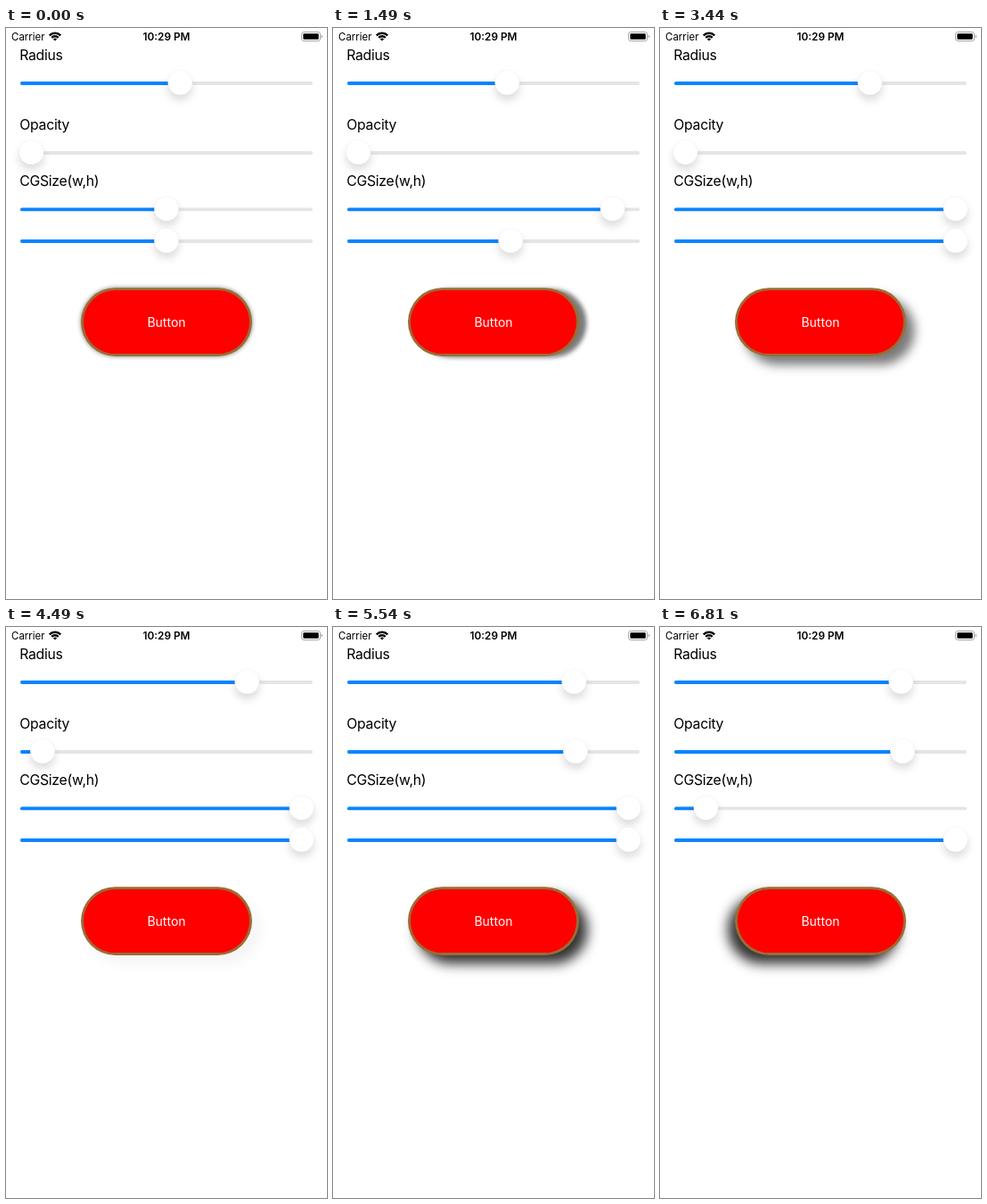
These frames come from a looping animation (360x640 px, 8000 ms). An HTML page with a canvas:

```html
<!DOCTYPE html>
<html lang="en">
<head>
<meta charset="utf-8">
<title>Button shadow</title>
<style>
html, body { margin: 0; width: 100%; height: 100%; overflow: hidden; background: #fff; }
canvas { display: block; width: 360px; height: 640px; }
</style>
</head>
<body>
<canvas id="stage"></canvas>
<script>
const LOOP = 8000;
const FONT = 'Inter, Roboto, sans-serif';
const PT = 0.96; // pixels per point
const MIN = 28.5, MAX = 331.5, MID = 180;
const canvas = document.getElementById('stage');
const ctx = canvas.getContext('2d');
const dpr = window.devicePixelRatio || 1;
canvas.width = 360 * dpr;
canvas.height = 640 * dpr;
ctx.scale(dpr, dpr);

// A drag moves a thumb to x in a few visible steps; power shapes its speed.
const drag = (start, x, steps = 1, power = 1, gap = 120) => ({ start, x, steps, power, gap });

const radius = { home: 195.3, drags: [drag(3440, 270.3, 4, 0.45)] };
const opacity = { home: MIN, drags: [drag(4490, 53.5, 2), drag(4850, 270, 4, 0.73), drag(5540, 272)] };
const width = { home: MID, drags: [drag(500, 313.5, 5, 1, 115), drag(2390, MAX), drag(6370, 51.5, 5, 1, 110)] };
const height = { home: MID, drags: [drag(1490, 325, 3, 1.84), drag(2390, MAX)] };

function thumbAt({ home, drags }, t) {
  let x = home;
  for (const d of drags) {
    if (t < d.start) break;
    const step = Math.min(d.steps, Math.floor((t - d.start) / d.gap) + 1);
    x += (d.x - x) * (step / d.steps) ** d.power;
  }
  return x;
}

const unit = x => (x - MIN) / (MAX - MIN);
const touched = (control, t) => t >= control.drags[0].start;

function pill(x, y, w, h, r, fill) {
  ctx.beginPath();
  ctx.roundRect(x, y, w, h, r);
  ctx.fillStyle = fill;
  ctx.fill();
}

function disc(x, y, r, fill) {
  ctx.beginPath();
  ctx.arc(x, y, r, 0, Math.PI * 2);
  ctx.fillStyle = fill;
  ctx.fill();
}

function withShadow(alpha, dx, dy, sigma, paint) {
  ctx.save();
  ctx.shadowColor = `rgba(0,0,0,${alpha})`;
  ctx.shadowOffsetX = dx * dpr;
  ctx.shadowOffsetY = dy * dpr;
  ctx.shadowBlur = sigma * 2 * dpr;
  paint();
  ctx.restore();
}

function text(str, x, y, size, { weight = 400, align = 'left', spacing = 0, color = '#000' } = {}) {
  ctx.font = `${weight} ${size}px ${FONT}`;
  ctx.textAlign = align;
  ctx.letterSpacing = `${spacing}px`;
  ctx.fillStyle = color;
  ctx.fillText(str, x, y);
}

const label = (str, y) => text(str, 15.2, y, 15.8, { spacing: -0.28 });

function wifi(x, y) {
  const from = -Math.PI * 0.75, to = -Math.PI * 0.25;
  ctx.fillStyle = '#000';
  for (let i = 0; i < 3; i++) {
    const outer = 10 - i * 3.5;
    ctx.beginPath();
    ctx.arc(x, y, outer, from, to);
    ctx.arc(x, y, i < 2 ? outer - 2.3 : 0, to, from, true);
    ctx.fill();
  }
}

function battery(x, y) {
  ctx.beginPath();
  ctx.roundRect(x, y, 21, 10, 2.6);
  ctx.strokeStyle = '#a6a6a6';
  ctx.lineWidth = 1;
  ctx.stroke();
  pill(x + 1.8, y + 1.8, 17.4, 6.4, 1.3, '#000');
  pill(x + 22.1, y + 3.2, 1.3, 3.6, [0, 1.3, 1.3, 0], '#a6a6a6');
}

function statusBar() {
  text('Carrier', 6, 13.9, 11.5);
  wifi(55, 14.6);
  text('10:29 PM', 180, 13.9, 11.8, { weight: 600, align: 'center' });
  battery(331.5, 4.5);
}

function slider(y, x) {
  const thick = 4 * PT;
  const track = (w, fill) => pill(16, y - thick / 2, w, thick, thick / 2, fill);
  track(328, '#e5e5e6');
  if (x > MIN) track(x - 16, '#0a84ff');
  withShadow(0.14, 0, 6, 4.8, () => disc(x, y - 0.8, 13.8, '#efefef'));
  disc(x, y - 0.8, 13.4, '#fff');
}

function button(dx, dy, sigma, alpha) {
  withShadow(alpha, dx, dy, sigma, () => pill(84, 291.2, 192, 76.8, 38.4, '#9b6c35'));
  pill(86.9, 294.1, 186.2, 71, 35.5, '#f00');
  text('Button', 180, 334.8, 14, { align: 'center', color: '#fff' });
}

function draw(t) {
  const r = thumbAt(radius, t), o = thumbAt(opacity, t);
  const w = thumbAt(width, t), h = thumbAt(height, t);
  ctx.fillStyle = '#fff';
  ctx.fillRect(0, 0, 360, 640);
  statusBar();
  label('Radius', 36);
  label('Opacity', 113.8);
  label('CGSize(w,h)', 177.2);
  slider(62, r);
  slider(140, o);
  slider(203.4, w);
  slider(239, h);
  // Radius and opacity keep their presets until their sliders are touched.
  const sigma = (touched(radius, t) ? unit(r) * 9 : 3) * PT;
  const alpha = touched(opacity, t) ? unit(o) : 0.52;
  const offset = x => (unit(x) * 2 - 1) * 10 * PT;
  button(offset(w), offset(h), sigma, alpha);
}

function frame() {
  draw(performance.now() % LOOP);
  requestAnimationFrame(frame);
}
frame();
</script>
</body>
</html>
```
